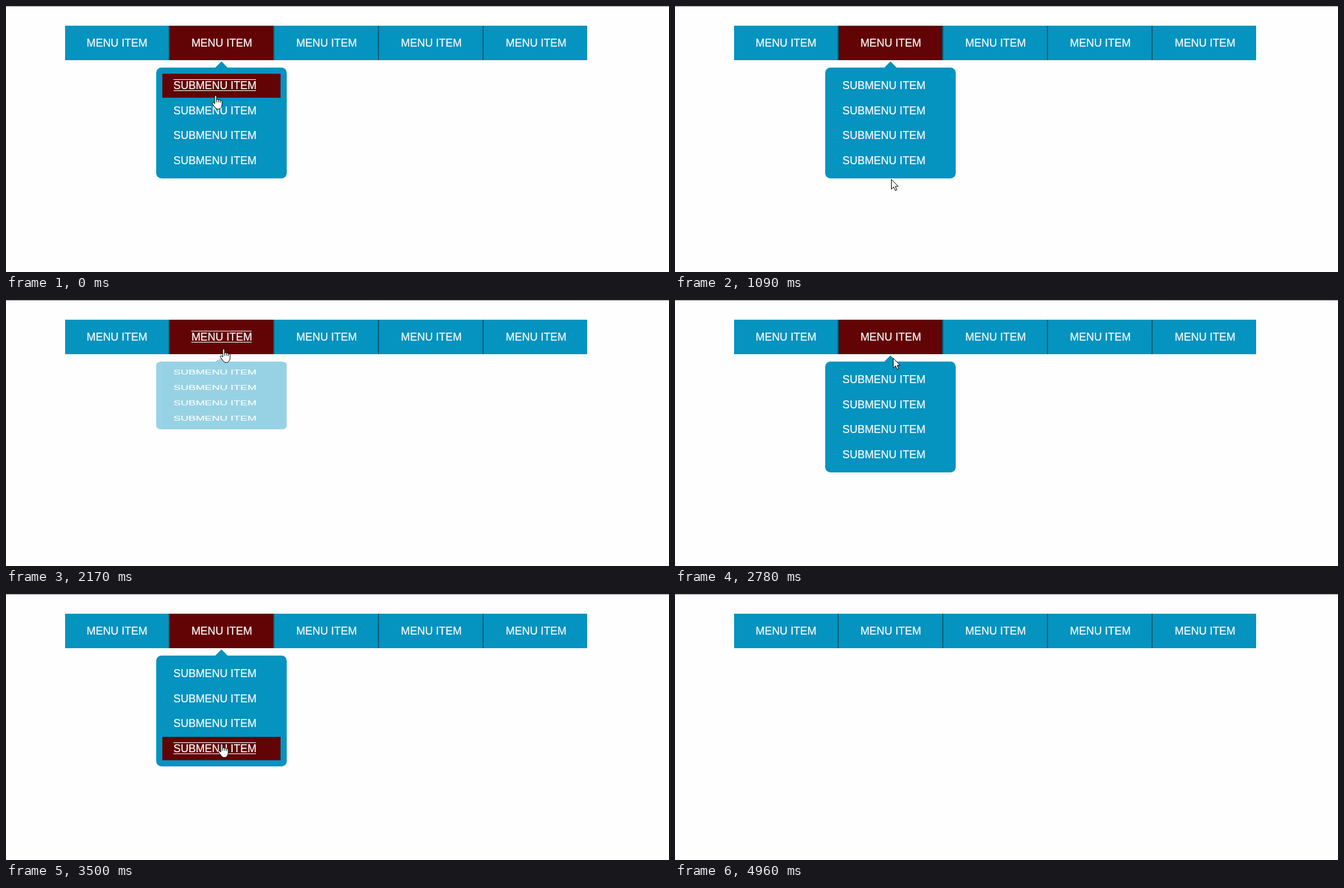
These frames come from a looping animation (1077 px wide and 432 px high, 5210 ms). An HTML page:

```html
<!DOCTYPE html>
<html lang="en">
<head>
<meta charset="utf-8">
<title>Dropdown menu</title>
<style>
  html, body { margin: 0; width: 100%; height: 100%; overflow: hidden; background: #fefefe; }
  svg { display: block; }
  text { font: 17.6px "Liberation Sans", Arial, sans-serif; fill: #fff; stroke: #fff; stroke-width: .2px; }
  .blue { fill: #0593bf; }
  .red { fill: #620405; }
  .line { fill: #fff; }
  .cursor { fill: #fff; stroke: #000; }
</style>
</head>
<body>
<svg width="1077" height="432" viewBox="0 0 1077 432">
  <rect width="1077" height="1" fill="#999"/>
  <rect class="blue" x="96" y="32" width="848" height="56"/>
  <rect id="active" class="red" x="266" y="32" width="168" height="56"/>
  <g id="bar"></g>
  <g id="submenu">
    <rect class="blue" x="244" y="100" width="212" height="180" rx="8.5"/>
    <path class="blue" d="M340 100.5V100L350 90L360 100V100.5Z"/>
    <rect id="highlight" class="red" x="254" width="192"/>
    <g id="labels"></g>
  </g>
  <g id="lines" class="line">
    <rect height="1"/>
    <rect height="1" y="18"/>
  </g>
  <path id="arrow" class="cursor" d="M.5 .5V16.5L4.3 13L6.8 18.7L9.3 17.6L6.9 12H11.7Z"/>
  <g id="hand" class="cursor" stroke-linejoin="round">
    <path d="M-1.5 2Q-1.5 .5 0 .5Q1.5 .5 1.5 2V7.5Q2 6.3 3.2 6.4Q4.6 6.5 4.7 7.8Q5.2 7 6.3 7.1Q7.5 7.3 7.6 8.6Q8.2 8 9 8.2Q10.5 8.5 10.5 10V15Q10.5 18 8.7 20.2Q7.5 22.5 4 22.5Q1 22.5 -.5 20.3L-5 14.2Q-6.2 12.3 -4.8 11.6Q-3.4 11.2 -1.5 13.7Z"/>
    <path d="M1.5 7V11.5M4.7 7.5V11.5M7.6 8.5V12" fill="none"/>
  </g>
</svg>
<script>
const LOOP = 5210, TICK = 120, FADE = .48;

// Extra milliseconds for which the pointer rests after a tick
const RESTS = { 5: 130, 20: 130, 34: 260, 37: 130 };

// Pointer waypoints: tick, x, y
const PATH = [
  [0, 340, 145], [5, 347, 250], [11, 355, 312], [16, 353, 80], [20, 354, 77],
  [21, 354, 94], [27, 350, 243], [30, 388, 302], [31, 438, 347], [34, 528, 458],
  [35, 594, 406], [36, 728, 402], [37, 862, 450]
];

// Ticks between which the menu is held open
const OPEN = [[-9, 8], [16, 30]];

const $ = id => document.getElementById(id);
const rowTop = i => Math.round(110 + i * 40.5);
const rowBottom = i => Math.round(148.5 + i * 40.5);
const baseline = i => Math.round(135 + i * 40.5);

function set(el, attrs) {
  for (const key in attrs) el.setAttribute(key, attrs[key]);
}

function add(parent, name, attrs, content = "") {
  const el = document.createElementNS("http://www.w3.org/2000/svg", name);
  set(el, attrs);
  el.textContent = content;
  parent.append(el);
}

function show(id, visible) {
  $(id).style.display = visible ? "" : "none";
}

function tickAt(time) {
  let tick = 0, end = TICK;
  while (time >= end) end += TICK + (RESTS[++tick] || 0);
  return tick;
}

function pointerAt(tick) {
  const i = Math.max(1, PATH.findIndex(point => point[0] >= tick));
  const [from, to] = [PATH[i - 1], PATH[i]];
  const p = (tick - from[0]) / (to[0] - from[0]);
  return [1, 2].map(k => Math.round(from[k] + (to[k] - from[k]) * p));
}

// Fades in shortly after opening starts, and out from the moment it ends
function opacityAt(tick) {
  const levels = OPEN.map(([start, end]) =>
    Math.min(1, FADE * (tick - start - .15), 1 - FADE * (tick - end)));
  return Math.max(0, ...levels);
}

for (let i = 0; i < 5; i++) {
  add($("bar"), "text", { x: 131 + i * 170.2, y: 66 }, "MENU ITEM");
  if (i) add($("bar"), "rect", { x: 94 + i * 170, y: 32, width: 2, height: 56, fill: "#036076" });
}
for (let i = 0; i < 4; i++) {
  add($("labels"), "text", { x: 272, y: baseline(i) }, "SUBMENU ITEM");
}

function draw(time) {
  const tick = tickAt(time);
  const [x, y] = pointerAt(tick);
  const opacity = opacityAt(tick);
  const scale = 1 - (1 - opacity) ** 1.8;
  const onBar = y >= 32 && y < 88;
  const row = opacity < 1 ? -1 : [0, 1, 2, 3].findIndex(i => y >= rowTop(i) && y < rowBottom(i));
  const onRow = row >= 0;
  const hover = onBar || onRow;

  show("active", OPEN.some(([start, end]) => tick >= start && tick <= end));
  show("submenu", opacity > 0);
  set($("submenu"), { opacity, transform: `translate(0 100) scale(1 ${scale}) translate(0 -100)` });

  show("highlight", onRow);
  if (onRow) set($("highlight"), { y: rowTop(row), height: rowBottom(row) - rowTop(row) });

  show("lines", hover);
  if (hover) {
    const [left, top, width] = onBar ? [301, 50, 98] : [272, baseline(row) - 16, 134];
    set($("lines"), { transform: `translate(${left} ${top})` });
    for (const line of $("lines").children) set(line, { width });
  }

  show("arrow", !hover);
  show("hand", hover);
  set($("arrow"), { transform: `translate(${x} ${y})` });
  set($("hand"), { transform: `translate(${x + .5} ${y})` });
}

const begin = performance.now();
function frame() {
  draw((performance.now() - begin) % LOOP);
  requestAnimationFrame(frame);
}
frame();
</script>
</body>
</html>
```
